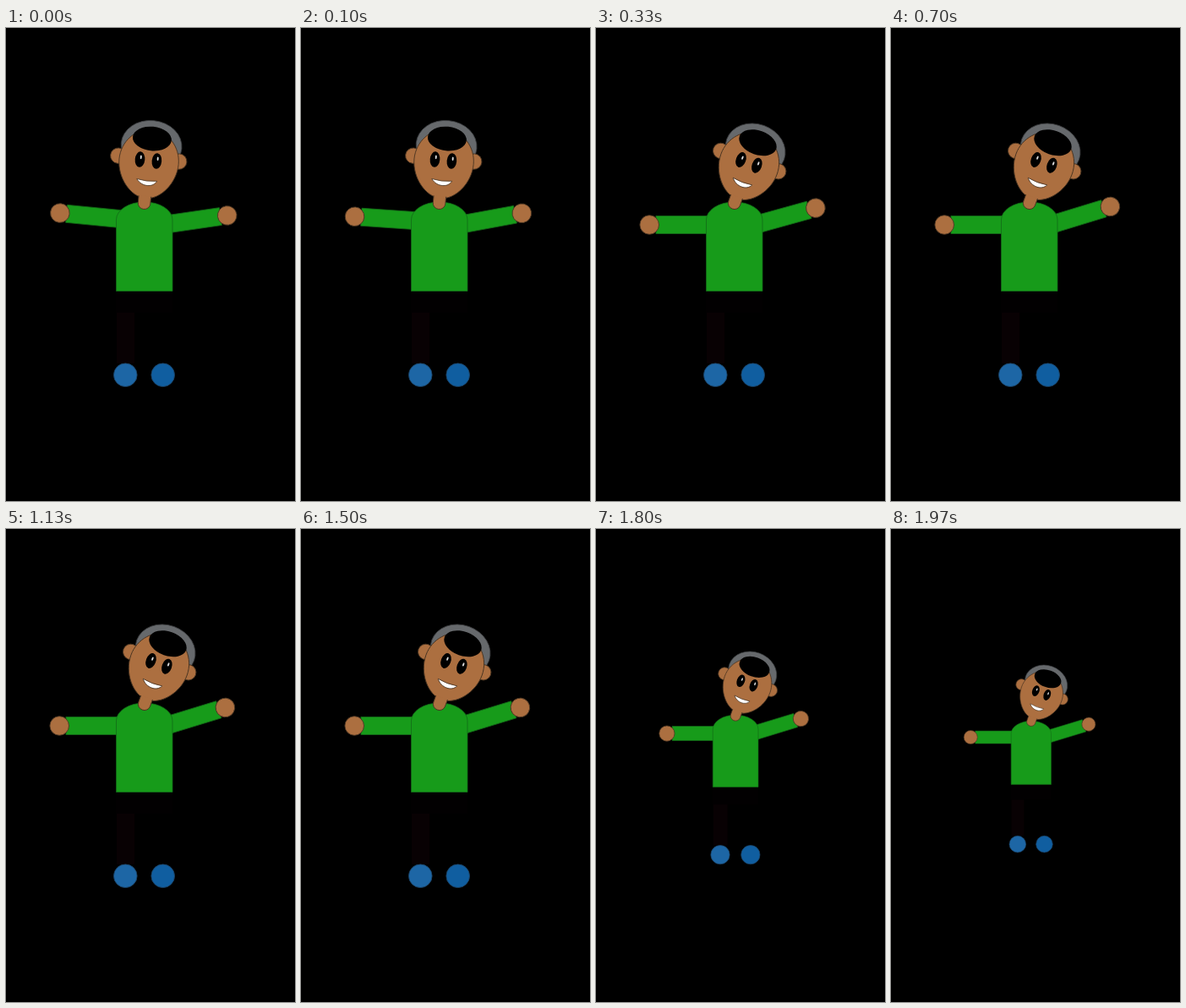
Write an HTML page that moves like this. It is 342 px wide and 560 px high and loops after 2 s.

```html
<!DOCTYPE html>
<html lang="en">
<head>
<meta charset="utf-8">
<title>Waving boy</title>
<style>
  html, body { margin: 0; width: 100%; height: 100%; overflow: hidden; background: #000; }
  svg { display: block; width: 342px; height: 560px; }
  .green { fill: #179b1a; stroke: #146a18; stroke-width: .8; }
  .skin { fill: #ac6f40; stroke: #4a3522; stroke-width: .9; }
</style>
</head>
<body>
<svg viewBox="0 0 342 560">
  <g id="figure">
    <path d="M130 311h67v26h-67z" fill="#020001"/>
    <path d="M131 337h21v60h-21z" fill="#080103"/>
    <g stroke="#1c4468" stroke-width=".9">
      <circle cx="141.3" cy="410.8" r="13.8" fill="#1d66a5"/>
      <circle cx="185.7" cy="410.8" r="13.8" fill="#105ea0"/>
    </g>

    <!-- Arms turn around their own origin -->
    <g id="left">
      <rect class="green" x="-135" y="-10.5" width="70" height="21"/>
      <circle class="skin" cx="-142.8" r="11.3"/>
    </g>
    <g id="right">
      <rect class="green" y="-10.5" width="63" height="21"/>
      <circle class="skin" cx="71" r="11.3"/>
    </g>

    <path class="green" d="M130.5 311.5V227A33.2 21 0 0 1 197 227V311.5z"/>

    <!-- Origin at the base of the neck -->
    <g id="head">
      <ellipse cx="2" cy="-69" rx="36" ry="30" fill="#66696c" stroke="#3c3e40" stroke-width=".8"/>
      <circle class="skin" cx="-36" cy="-53.6" r="9.2"/>
      <circle class="skin" cx="36.3" cy="-53.6" r="9.2"/>
      <path class="skin" d="M-34.5-50C-34.5-28-17-6.5 .8-6.5S36-28 36-50C36-71 20-88 .8-88S-34.5-71-34.5-50z"/>
      <path class="skin" d="M-7.3-9V-.5A7.3 7 0 0 0 7.3-.5V-9"/>
      <ellipse cx="2" cy="-77.5" rx="23" ry="14.3"/>
      <ellipse cx="-10" cy="-51.7" rx="5.8" ry="9.3"/>
      <ellipse cx="10" cy="-51.7" rx="5.8" ry="9.3"/>
      <g fill="#ddd">
        <ellipse cx="-9" cy="-54.5" rx="1" ry="2.3"/>
        <ellipse cx="11" cy="-54.5" rx="1" ry="2.3"/>
      </g>
      <path d="M-11.5-28.5Q0-26 12.5-28C9-19.8-5-19.3-11.5-28.5z" fill="#fff" stroke="#4a3522" stroke-width=".8"/>
    </g>
  </g>
</svg>
<script>
  const LOOP = 2000, FPS = 30;
  const set = (id, value) => document.getElementById(id).setAttribute('transform', value);

  // Linear change from a to b between two frames, held outside them
  const tween = (frame, start, end, a, b) =>
    a + (b - a) * Math.min(1, Math.max(0, (frame - start) / (end - start)));

  const turn = (id, x, y, angle) => set(id, `translate(${x} ${y}) rotate(${angle})`);

  function draw(now) {
    // The small offset absorbs clocks rounded down to 10 ms
    const frame = Math.floor((now % LOOP + 3.5) * FPS / 1000);
    turn('left', 206, 233, tween(frame, 0, 10, 5.6, 0));
    turn('right', 191.5, 232.2, tween(frame, 0, 12, -8.3, -17));
    turn('head', 163.5, 208, tween(frame, 3, 10, 5.5, 19.7));
    const scale = tween(frame, 48, 57, 1, .712);
    set('figure', `translate(171 280) scale(${scale}) translate(-171 -280)`);
  }

  const start = performance.now();
  function loop() {
    draw(performance.now() - start);
    requestAnimationFrame(loop);
  }
  loop();
</script>
</body>
</html>
```
